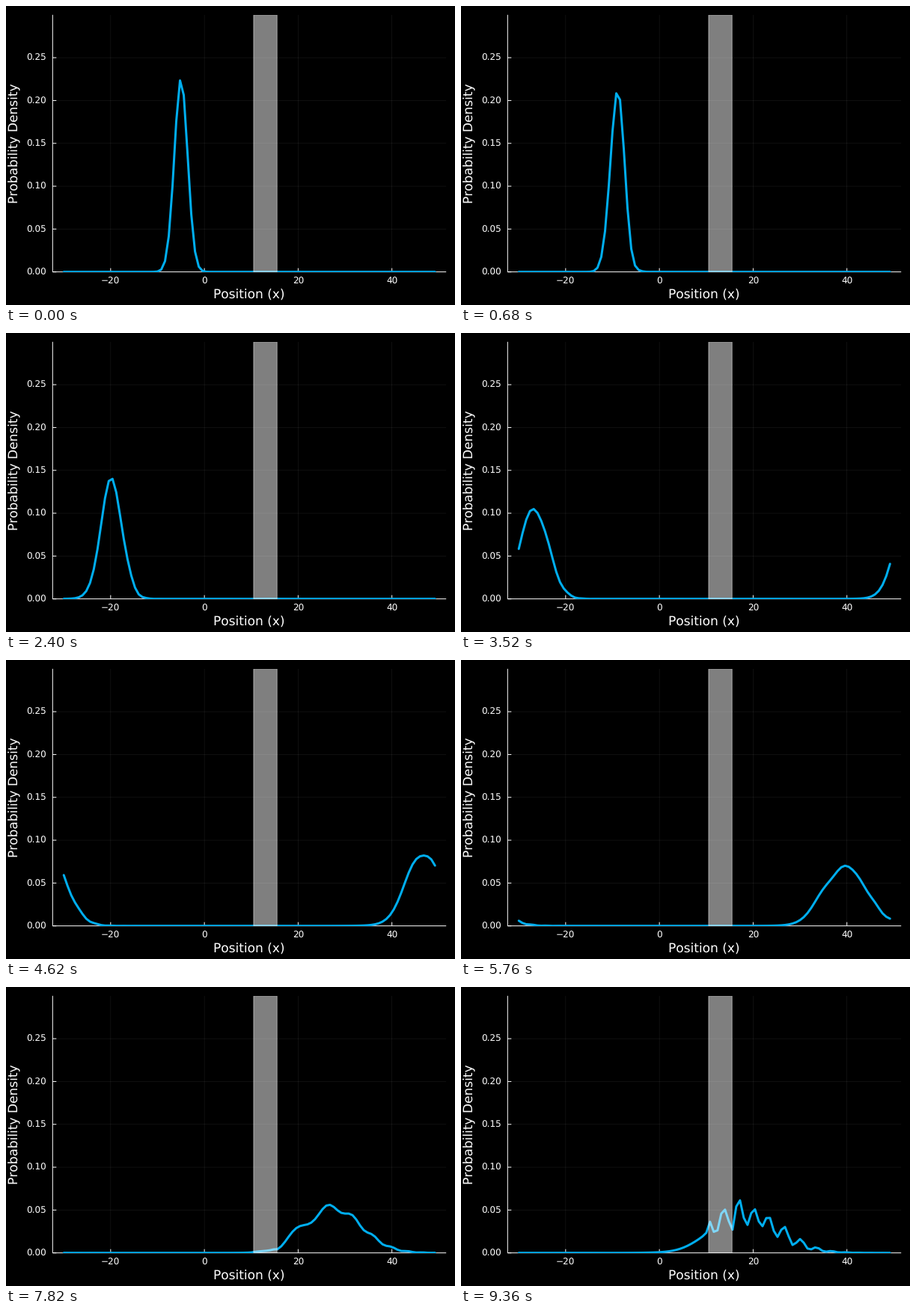
Recreate the animation shown at these times as a matplotlib script. Size 600x400 px, loop 9.46 s.

```python
import numpy as np
import matplotlib.pyplot as plt
from matplotlib.animation import FuncAnimation
from matplotlib.transforms import Affine2D

W, H, DPI = 600, 400, 100
PX = 72 / DPI                                  # one pixel in points
LEFT, RIGHT, TOP, BOTTOM = 62.3, 588.2, 11.8, 355.7
Y_MAX = 0.3
LINE = "#00aeef"
SMALL, LARGE = 12, 16.5                        # text sizes in pixels

# periodic grid, wave packet and square barrier
N, X_MIN, X_MAX = 100, -30, 50
X0, P0, SIGMA = -5, 5, 2
B_MID, B_WIDTH, B_HEIGHT = 13, 5, 1.0
STEPS, DT = 201, 0.1


def densities():
    """Position density of the packet at every time step."""
    dx = (X_MAX - X_MIN) / N
    x = X_MIN + dx * np.arange(N)
    k = 2 * np.pi * np.fft.fftfreq(N, dx)
    kinetic = np.fft.ifft(k[:, None] ** 2 / 2 * np.fft.fft(np.eye(N), axis=0), axis=0)
    barrier = np.where(abs(x - B_MID) <= B_WIDTH / 2, B_HEIGHT, 0)
    ham = kinetic + np.diag(barrier)
    energy, modes = np.linalg.eigh((ham + ham.conj().T) / 2)

    psi = np.exp(1j * P0 * x - (x - X0) ** 2 / (2 * SIGMA ** 2))
    psi /= np.linalg.norm(psi)
    t = DT * np.arange(STEPS)
    phases = np.exp(-1j * np.outer(energy, t))
    waves = modes @ (phases * (modes.conj().T @ psi)[:, None])
    return x, abs(waves.T) ** 2


x, rho = densities()

# uneven playback: every third step is held for five ticks of 20 ms
hold = np.where(np.arange(STEPS) % 3 == 1, 5, 1)
hold[-1] = 5
schedule = np.repeat(np.arange(STEPS), hold)

plt.rcParams.update({"font.family": "DejaVu Sans", "text.hinting": "none",
                     "text.hinting_factor": 1})
fig = plt.figure(figsize=(W / DPI, H / DPI), dpi=DPI, facecolor="black")
ax = fig.add_axes([LEFT / W, 1 - BOTTOM / H, (RIGHT - LEFT) / W, (BOTTOM - TOP) / H])
ax.set_axis_off()
pad = 0.03 * (x[-1] - x[0])
x_lo, x_hi = x[0] - pad, x[-1] + pad
ax.set_xlim(x_lo, x_hi)
ax.set_ylim(0, Y_MAX)

# pixel coordinates with the origin at the top left
pixels = Affine2D().scale(1 / W, -1 / H).translate(0, 1) + fig.transFigure


def rule(x0, y0, x1, y1, color="white", width=1.0, **kw):
    ax.plot([x0, x1], [y0, y1], color=color, lw=width * PX, transform=pixels,
            clip_on=False, snap=False, solid_capstyle="butt", **kw)


def label(px, py, text, size, ha="center", rotation=0):
    ax.text(px, py, text, color="white", fontsize=size * PX, transform=pixels,
            ha=ha, va="baseline", rotation=rotation, rotation_mode="anchor")


GRID = dict(width=0.6, alpha=0.1, zorder=1)
for v in range(-20, 41, 20):
    px = LEFT + (v - x_lo) / (x_hi - x_lo) * (RIGHT - LEFT)
    rule(px, TOP, px, BOTTOM, **GRID)
    rule(px, BOTTOM, px, BOTTOM - 5)
    label(px, 371.8, f"{v}".replace("-", "\u2212"), SMALL)
for v in np.arange(0, 0.26, 0.05):
    py = BOTTOM - v / Y_MAX * (BOTTOM - TOP)
    rule(LEFT, py, RIGHT, py, **GRID)
    rule(LEFT, py, LEFT + 5, py)
    label(54, py + 4.2, f"{v:.2f}", SMALL, ha="right")
rule(LEFT, TOP, LEFT, BOTTOM)
rule(LEFT, BOTTOM, RIGHT, BOTTOM)
label((LEFT + RIGHT) / 2, 392, "Position (x)", LARGE)
label(16, (TOP + BOTTOM) / 2, "Probability Density", LARGE, rotation=90)

curve, = ax.plot(x, rho[0], color=LINE, lw=3 * PX, zorder=4, snap=False,
                 solid_joinstyle="round", solid_capstyle="round")
ax.axvspan(B_MID - B_WIDTH / 2, B_MID + B_WIDTH / 2, facecolor=(1, 1, 1, 0.5),
           edgecolor=(1, 1, 1, 0.5), lw=PX, snap=False, zorder=5)


def draw(tick):
    curve.set_ydata(rho[schedule[tick]])
    return curve,


anim = FuncAnimation(fig, draw, frames=len(schedule), interval=20,
                     repeat=True, repeat_delay=0)
plt.show()
```
